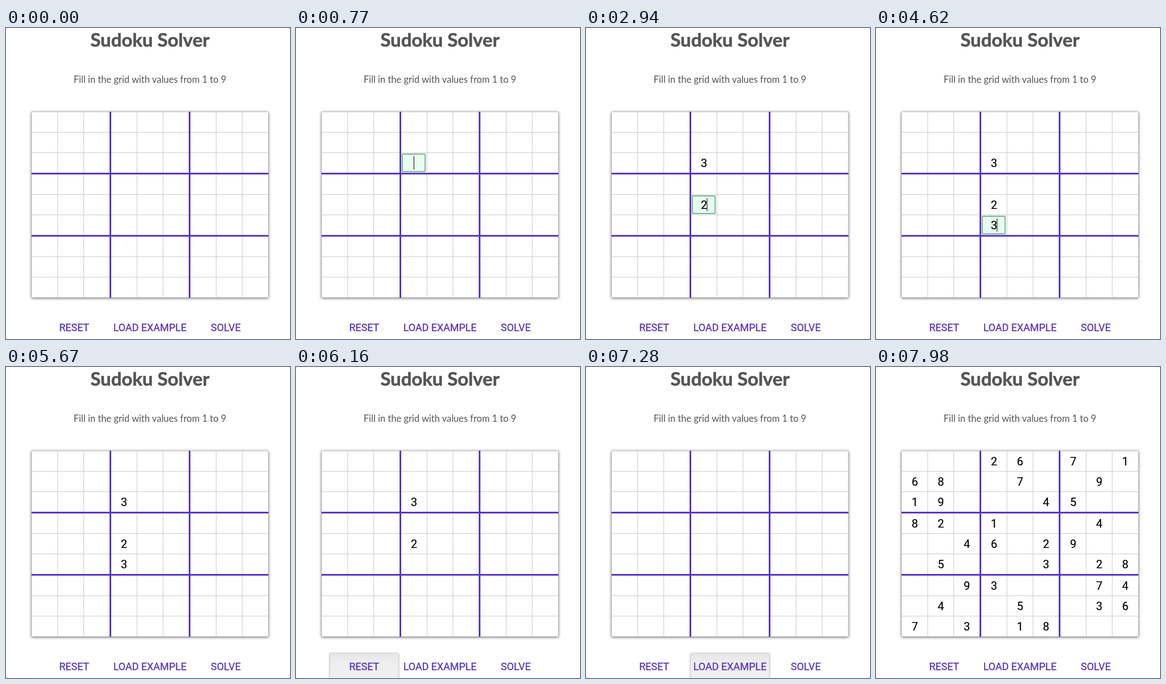
Write an HTML page that moves like this. It is 502x550 px and loops after 8000 ms.

```html
<!DOCTYPE html>
<html lang="en">
<head>
<meta charset="utf-8">
<title>Sudoku Solver</title>
<style>
  html, body { margin: 0; width: 100%; height: 100%; overflow: hidden; background: #ccc; }
  svg { display: block; width: 502px; height: 550px; background: #fff; border-radius: 3px; }
  text { text-anchor: middle; }
  .title { font: 700 33px Lato, sans-serif; fill: #555; stroke: #555; stroke-width: .6; }
  .hint { font: 400 16.55px Lato, sans-serif; fill: #555; }
  .label { font: 400 18px Roboto, sans-serif; fill: #5633bb; stroke: #5633bb; stroke-width: .3; }
  .digit { font: 400 20px Roboto, sans-serif; fill: #000; stroke: #000; stroke-width: .2; }
  .board { fill: #fff; filter: drop-shadow(0 1px 2.5px rgba(0, 0, 0, .6)); }
  .thin { stroke: #ccc; fill: none; }
  .thick { stroke: #5a35c6; stroke-width: 3; }
  .focus { fill: #e8fcf0; stroke: #69ac82; stroke-width: 1.8; }
  .press { fill: url(#pressed); stroke: #d6d6d6; }
  .inset { fill: none; stroke: #ddd; stroke-width: 2; opacity: .6; }
</style>
</head>
<body>
<svg viewBox="0 0 502 550">
  <defs>
    <linearGradient id="pressed" x2="0" y2="1">
      <stop offset="0" stop-color="#e6e6e6"/>
      <stop offset=".35" stop-color="#eee"/>
      <stop offset="1" stop-color="#f0f0f0"/>
    </linearGradient>
  </defs>
  <text class="title" x="254.5" y="32.5">Sudoku Solver</text>
  <text class="hint" x="254.5" y="97">Fill in the grid with values from 1 to 9</text>
</svg>
<script>
const LOOP = 8000;
const svg = document.querySelector('svg');

function add(tag, attrs, content = '') {
  const node = document.createElementNS('http://www.w3.org/2000/svg', tag);
  for (const key in attrs) node.setAttribute(key, attrs[key]);
  node.textContent = content;
  svg.append(node);
  return node;
}
const line = (kind, x1, y1, x2, y2) => add('line', { class: kind, x1, y1, x2, y2 });

// Cell centres; each block of three is offset by its thick divider.
const colX = c => 68.5 + c * 46 + Math.floor(c / 3) * 2;
const rowY = r => 167 + r * 36 + Math.floor(r / 3) * 2;

add('rect', { class: 'board', x: 45, y: 148, width: 419, height: 329, rx: 1 });
add('rect', { class: 'thin', x: 45.5, y: 148.5, width: 418, height: 328 });
for (let i = 1; i < 9; i++) {
  if (i % 3 === 0) continue;
  const x = colX(i) - 23, y = rowY(i) - 18.5;
  line('thin', x, 148, x, 477);
  line('thin', 45, y, 464, y);
}
for (const x of [184.5, 324.5]) line('thick', x, 148, x, 477);
for (const y of [257.5, 367.5]) line('thick', 45, y, 464, y);

const focusBox = add('rect', { class: 'focus', x: 187.9, width: 40.4, height: 31.4, rx: 1.5 });

const EXAMPLE = ['...26.7.1', '68..7..9.', '19...45..',
                 '82.1...4.', '..46.29..', '.5...3.28',
                 '..93...74', '.4..5..36', '7.3.18...'];
const digits = [];
const putDigit = (row, col, value, from, to) => digits.push({
  from, to, node: add('text', { class: 'digit', x: colX(col), y: rowY(row) + 7 }, value)
});
putDigit(2, 3, '3', 1540, 6230);
putDigit(4, 3, '2', 2800, 6230);
putDigit(5, 3, '3', 4410, 5810);
EXAMPLE.forEach((cells, row) => [...cells].forEach((value, col) => {
  if (value !== '.') putDigit(row, col, value, 7420, LOOP);
}));

const caret = add('rect', { width: 1, height: 23, fill: '#000' });

// Focused row, when it gains focus, when its digit is typed, when it blurs.
const EDITS = [
  { row: 2, from: 630, typed: 1540, to: 2100 },
  { row: 4, from: 2100, typed: 2800, to: 3640 },
  { row: 5, from: 3640, typed: 4410, to: 4900 }
];

function makeButton(label, centre, width, times) {
  const box = { x: centre - width / 2, y: 505.5, width, height: 50, rx: 3 };
  const parts = [
    add('rect', { class: 'press', ...box }),
    add('rect', { class: 'inset', ...box, x: box.x + 1.5, y: 507, width: width - 3, height: 47 })
  ];
  add('text', { class: 'label', x: centre, y: 536 }, label);
  return { parts, times };
}
// Press times: fade-in start, full, release, fade-out end.
const buttons = [
  makeButton('RESET', 120.5, 124, [6020, 6160, 6230, 6440]),
  makeButton('LOAD EXAMPLE', 254.5, 142, [7070, 7210, 7350, 7560]),
  makeButton('SOLVE', 388.5, 124, [LOOP, LOOP, LOOP, LOOP])
];

const clamp = v => Math.max(0, Math.min(1, v));
const show = (node, on) => { node.style.visibility = on ? 'visible' : 'hidden'; };

function render(t) {
  for (const d of digits) show(d.node, t >= d.from && t < d.to);

  const edit = EDITS.find(e => t >= e.from && t < e.to);
  show(focusBox, edit);
  let caretOn = false;
  if (edit) {
    const typed = t >= edit.typed;
    const since = t - (typed ? edit.typed : edit.from);
    const y = rowY(edit.row);
    caretOn = Math.floor(since / 490) % 2 === 0;
    focusBox.setAttribute('y', y - 16.2);
    caret.setAttribute('x', typed ? 213.5 : 208);
    caret.setAttribute('y', y - 12);
  }
  show(caret, caretOn);

  for (const { parts, times: [start, full, release, end] } of buttons) {
    const level = t < start || t >= end ? 0
      : t < full ? clamp((t - start) / (full - start))
      : 1 - clamp((t - release) / (end - release));
    parts[0].style.opacity = level;
    parts[1].style.opacity = level * .6;
  }
}

const began = performance.now();
function tick() {
  render((performance.now() - began) % LOOP);
  requestAnimationFrame(tick);
}
tick();
</script>
</body>
</html>
```
